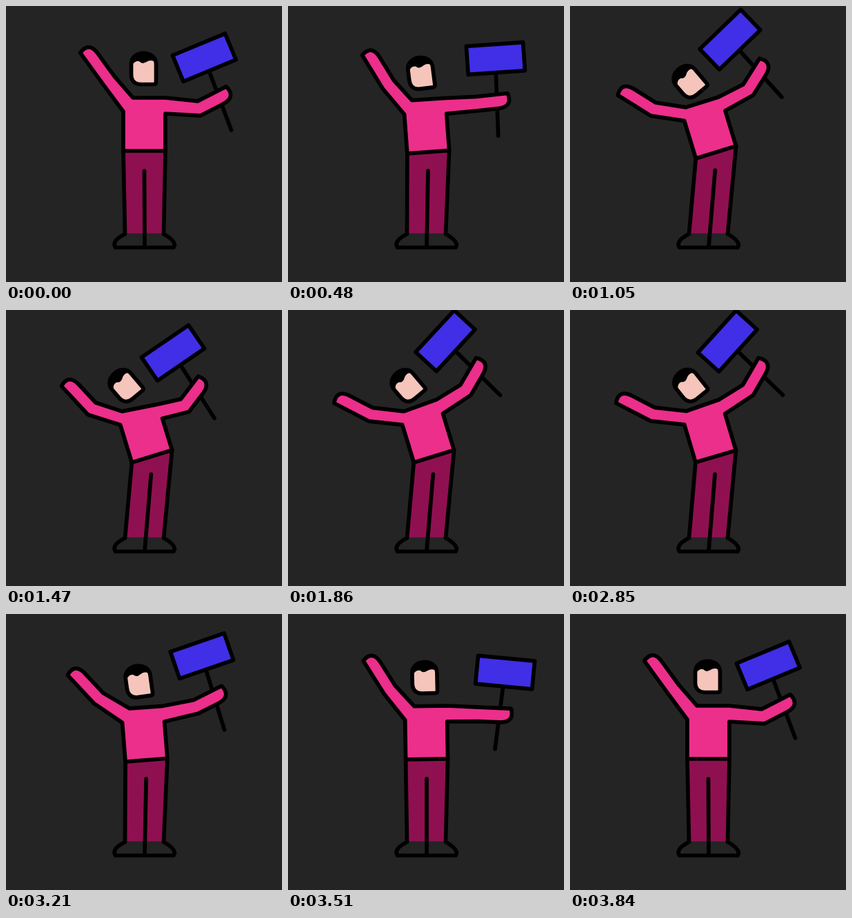
An HTML page with a canvas for the animation above (5.87 s loop, 400 by 400 pixels).

```html
<!DOCTYPE html>
<html lang="en">
<head>
<meta charset="utf-8">
<title>Waving a sign</title>
<style>
  html, body { margin: 0; width: 100%; height: 100%; overflow: hidden; background: #242424; }
  canvas { display: block; width: 100vmin; height: 100vmin; }
</style>
</head>
<body>
<canvas id="stage" width="400" height="400"></canvas>
<script>
const ctx = document.getElementById('stage').getContext('2d');
const LOOP = 5870, STEP = 30, END = 3840;
const PINK = '#eb2f8b', PLUM = '#8f1050', BLUE = '#402fe6', SKIN = '#f5c5bb', INK = '#000', BG = '#242424';

// time, lean, left upper arm, left forearm, right upper arm, right forearm, sign (degrees)
const KEYS = [
  [0, 0, 53.5, 54, -6, 27, 22.5],
  [330, .08, 51, 60, -2, -3, -6],
  [480, .25, 50, 58.5, 2.6, 6.2, 4],
  [600, .4, 32, 45, 15, 30, 24],
  [940, .98, 6, 27, 32, 60, 48],
  [1050, 1, 8.5, 32, 27, 58, 44],
  [1420, 1, 17.7, 47.8, 12, 52.5, 34],
  [1900, 1, 6, 27, 32, 60, 47.5],
  [2370, 1, 17.7, 47.8, 12, 52.5, 34],
  [2890, .97, 6, 27, 32, 60, 48],
  [3210, .27, 34, 47, 11, 26.6, 19],
  [3480, .06, 51, 58, -2, -3, -6],
  [END, 0, 53.5, 54, -6, 27, 22.5]
];

const rad = deg => deg * Math.PI / 180;

// Point at (along, across) from p, in axes given by direction d and normal n.
const local = (p, d, n, along, across) =>
  [p[0] + d[0] * along + n[0] * across, p[1] + d[1] * along + n[1] * across];

const slope = (i, c) => (KEYS[i + 1][c] - KEYS[i][c]) / (KEYS[i + 1][0] - KEYS[i][0]);

function tangent(i, c) {
  if (i === 0 || i === KEYS.length - 1) return 0;
  const a = slope(i - 1, c), b = slope(i, c);
  return a * b <= 0 ? 0 : 2 * a * b / (a + b);
}

// Monotone cubic interpolation of all pose values.
function poseAt(t) {
  let i = 0;
  while (i < KEYS.length - 2 && t >= KEYS[i + 1][0]) i++;
  const a = KEYS[i], b = KEYS[i + 1], h = b[0] - a[0];
  const s = (t - a[0]) / h, s2 = s * s, s3 = s2 * s;
  return a.slice(1).map((v, j) => {
    const c = j + 1;
    return v + (b[c] - v) * (3 * s2 - 2 * s3) +
      h * (tangent(i, c) * (s3 - 2 * s2 + s) + tangent(i + 1, c) * (s3 - s2));
  });
}

// Arm from one fixed edge point; side is -1 for left, 1 for right.
function arm(start, side, upper, fore, upperLen, foreLen, width) {
  const along = a => [side * Math.cos(rad(a)), -Math.sin(rad(a))];
  const across = a => [Math.sin(rad(a)), side * Math.cos(rad(a))];
  const d = along(fore), n = across(fore);
  const elbow = local(start, along(upper), n, upperLen, 0);
  const tip = local(elbow, d, n, foreLen, 0);
  const miter = width / Math.cos(rad((fore - upper) / 2));
  return {
    elbow, tip, d, n,
    inner: local(elbow, d, across((upper + fore) / 2), 0, miter),
    cap: [[3, 9], [3, width], [-16, width]].map(q => local(tip, d, n, ...q))
  };
}

const lineOn = (...pts) => pts.forEach(p => ctx.lineTo(...p));

function line(first, ...rest) {
  ctx.moveTo(...first);
  lineOn(...rest);
}

function shape(fill, path) {
  ctx.beginPath();
  path();
  if (fill) { ctx.fillStyle = fill; ctx.fill(); }
  ctx.stroke();
}

function drawSign(grip, angle) {
  ctx.save();
  ctx.translate(...grip);
  ctx.rotate(-rad(angle));
  ctx.translate(-2, -60);
  shape(null, () => line([-1, 20], [-4, 112]));
  shape(BLUE, () => ctx.rect(-41.2, -20.5, 82.4, 41));
  ctx.restore();
}

function drawLegs(hipL, hipR, k) {
  ctx.beginPath();
  line(hipL, hipR, [228.5, 329.5], [173, 329.5]);
  ctx.fillStyle = PLUM;
  ctx.fill();
  shape(null, () => {
    line(hipL, [172.5, 330.5]);
    ctx.quadraticCurveTo(157, 338, 157, 346);
    lineOn([158.5, 350], [243, 350], [244.5, 346]);
    ctx.quadraticCurveTo(243, 338, 228.5, 330.5);
    lineOn(hipR);
  });
  shape(null, () => line([200.5 + 9.8 * k, 239 - k], [201, 349]));
}

function drawHead(k) {
  ctx.save();
  ctx.translate(199.5 - 27.5 * k, 91 + 28 * k - 10 * k * k);
  ctx.rotate(-rad(25 * k + 15 * k * k));
  shape(SKIN, () => {
    ctx.moveTo(-18, -7);
    ctx.bezierCurveTo(-18, -28, 18, -28, 18, -7);
    ctx.lineTo(18, 19);
    ctx.quadraticCurveTo(18, 22.5, 14.5, 22.5);
    ctx.lineTo(-4, 22.5);
    ctx.bezierCurveTo(-13, 22.5, -18, 17, -18, 8);
    ctx.closePath();
  });
  ctx.beginPath();
  ctx.moveTo(-18, -2);
  ctx.bezierCurveTo(-15, -10, -10, -12, -6, -10.5);
  ctx.bezierCurveTo(-3, -7.5, 0, -7.5, 4, -10);
  ctx.bezierCurveTo(9, -13, 14, -13, 18, -8);
  ctx.bezierCurveTo(17, -28, -18, -28, -18, -2);
  ctx.fillStyle = INK;
  ctx.fill();
  ctx.restore();
}

function draw(t) {
  const [k, leftUp, leftFore, rightUp, rightFore, sign] = poseAt(t);
  const lean = rad(17 * k), cos = Math.cos(lean), sin = Math.sin(lean);
  const hip = [200.5 + 11 * k, 210 + 8 * k - 6 * k * k];
  const torso = (x, y) => local(hip, [cos, -sin], [sin, cos], x, y);

  // The right shoulder sinks as its arm comes down in the lean.
  const drop = .4 * k * k * (28 - rightUp);
  const hipL = torso(-30.5, 0), hipR = torso(30.5, 0);
  const pitL = torso(-30.5, -57), pitR = torso(30.5, drop - 54);
  const neckL = torso(-16.5 - 6 * k, -77 + 2 * k);
  const neckR = torso(30.5 - 3 * k * k, -77 + k + drop);
  const left = arm(pitL, -1, leftUp, leftFore, 49, 56.5, 20);
  const right = arm(neckR, 1, rightUp, rightFore, 47 - 7 * k - drop / 2, 46.5 - 2 * k - drop / 2, 20.5);

  ctx.fillStyle = BG;
  ctx.fillRect(0, 0, 400, 400);
  ctx.strokeStyle = INK;
  ctx.lineWidth = 5.7;
  ctx.lineCap = ctx.lineJoin = 'round';

  drawSign(local(right.tip, right.d, right.n, -12, 8), sign);
  drawLegs(hipL, hipR, k);
  shape(PINK, () => {
    line(hipL, pitL, left.elbow, left.tip);
    ctx.bezierCurveTo(...left.cap.flat());
    lineOn(left.inner, neckL, neckR, right.elbow, right.tip);
    ctx.bezierCurveTo(...right.cap.flat());
    lineOn(right.inner, pitR, hipR);
    ctx.closePath();
  });
  drawHead(k);
}

const begin = performance.now();

function tick() {
  const t = Math.floor(((performance.now() - begin) % LOOP) / STEP) * STEP;
  draw(Math.min(t, END));
  requestAnimationFrame(tick);
}

tick();
</script>
</body>
</html>
```
